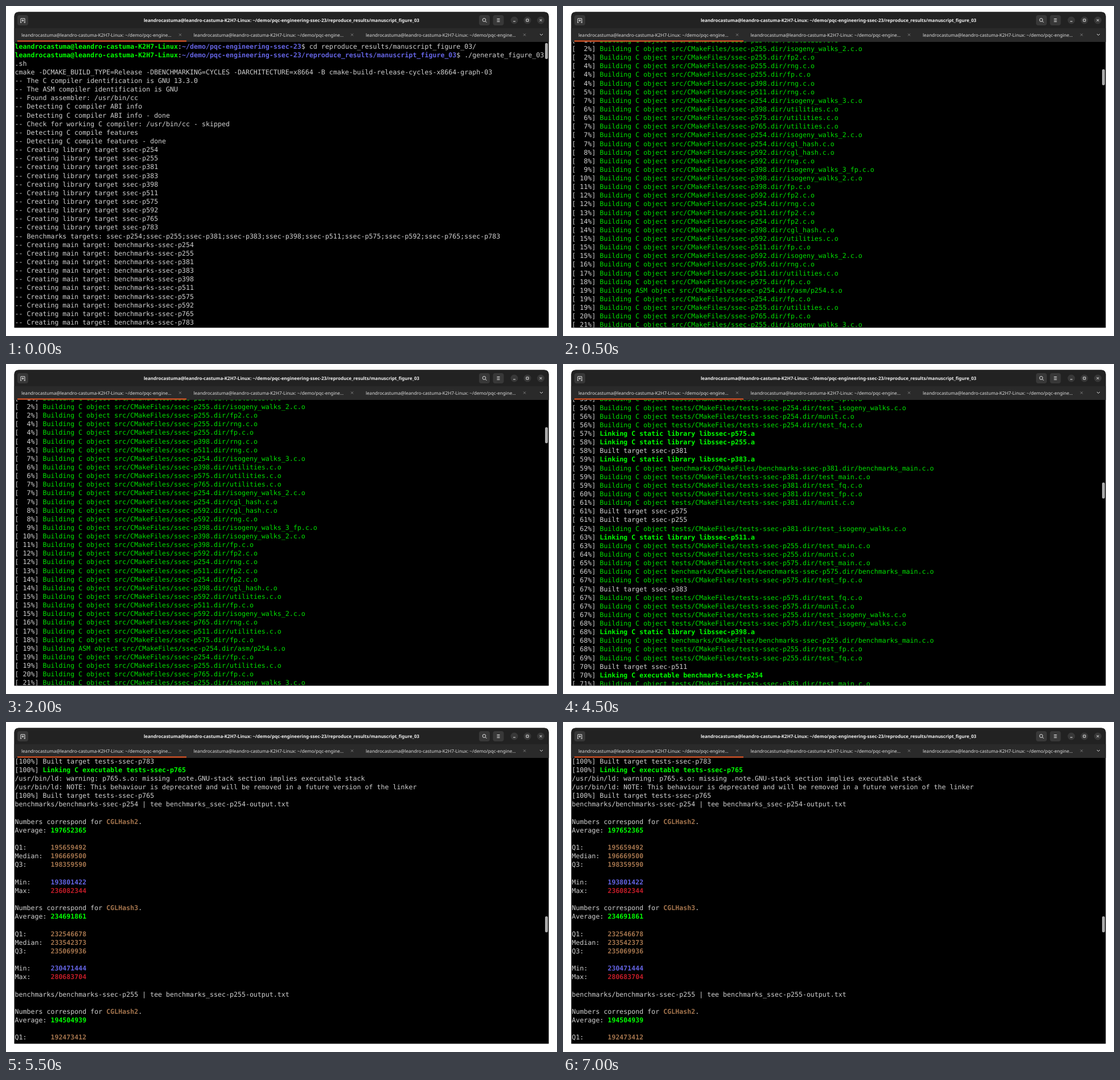
An HTML page that plays this animation: 968x579 px, repeating every 8000 ms.

```html
<!DOCTYPE html>
<html lang="en">
<head>
<meta charset="utf-8">
<title>Terminal build</title>
<style>
  html, body { margin: 0; width: 100%; height: 100%; overflow: hidden; background: #fff; }
  svg { position: absolute; left: 0; top: 0; font-family: "Noto Sans", sans-serif; text-rendering: geometricPrecision; }
  #view { position: absolute; left: 15px; top: 63px; width: 938px; height: 501px; overflow: hidden; }
  pre {
    position: absolute; left: .5px; margin: 0; color: #d0d0d0;
    font: 11.61px/15.14px "DejaVu Sans Mono", monospace; text-rendering: geometricPrecision;
  }
  #thumb { position: absolute; left: 932px; width: 5px; height: 28px; border-radius: 2px; background: #aaa; }
  i { font-style: normal; color: #00e000; }
  .green { color: #0f0; }
  .blue { color: #6464e4; }
  .brown { color: #a2734c; }
  .red { color: #c01c28; }
</style>
</head>
<body>
<svg width="968" height="579" fill="none" stroke="#e4e4e4">
  <g stroke="none">
    <path d="M14.500 564.500V18.500q0-8 8-8H945.500q8 0 8 8V564.500z" fill="#000"/>
    <path d="M14.500 63V18.500q0-8 8-8H945.500q8 0 8 8V63z" fill="#222"/>
    <path d="M14.500 39H953.500V63H14.500z" fill="#2a2a2a"/>
  </g>
  <path d="M20 61.5H317" stroke="#e95420" stroke-width="2"/>
  <g fill="#383838" stroke="none">
    <rect x="20" y="16" width="19" height="18" rx="4"/>
    <rect x="831" y="16" width="19" height="18" rx="4"/>
    <rect x="855.5" y="16" width="19" height="18" rx="4"/>
    <circle cx="893" cy="25" r="6.5"/><circle cx="916" cy="25" r="6.5"/><circle cx="939.5" cy="25" r="6.5"/>
  </g>
  <path d="M26 29V22h7v7M25 29h2.5M31.500 29H34M29.500 23.500v4M27.500 25.500h4"/>
  <circle cx="840" cy="24.500" r="2.800"/>
  <path d="M842 26.500l2.500 2.500M862.500 22.500h5M862.500 25h5M862.500 27.500h5M891 27h4M914 23h4v4h-4zM937.500 23l4 4m0-4l-4 4M938 49l2.500 2.500L943 49"/>
  <g id="labels" fill="#ddd" stroke="none" font-size="8.06"></g>
  <path id="crosses" stroke="#858585" stroke-width=".9"/>
</svg>
<div id="view"><pre id="screen"></pre><div id="thumb"></div></div>

<script>
const $ = id => document.getElementById(id);
const user = "leandrocastuma@leandro-castuma-K2H7-Linux";
const project = "~/demo/pqc-engineering-ssec-23";
const folder = "/reproduce_results/manuscript_figure_03";
const primes = [254, 255, 381, 383, 398, 511, 575, 592, 765, 783];

const bold = (color, text) => `<b class="${color}">${text}</b>`;
const prompt = (path, command) => `${bold("green", user)}:${bold("blue", path)}$ ${command}`;
const progress = (percent, text) => `[${String(percent).padStart(3)}%] ${text}`;
const lines = text => text.trim().split("\n");

// Window labels
$("labels").innerHTML =
  `<text x="484" y="28" text-anchor="middle" font-size="7.98" font-weight="700" fill="#f2f2f2">${user}: ${project}${folder}</text>` +
  [27, 329.5, 632].map(x => `<text x="${x}" y="53.5">${user}: ~/demo/pqc-engine…</text>`).join("");
$("crosses").setAttribute("d", [306, 608, 911].map(x => `M${x - 2} 48.5l4 4m0-4l-4 4`).join(""));

const configure = [
  prompt(project, "cd reproduce_results/manuscript_figure_03/"),
  prompt(project + folder, "./generate_figure_03"),
  ".sh",
  "cmake -DCMAKE_BUILD_TYPE=Release -DBENCHMARKING=CYCLES -DARCHITECTURE=x8664 -B cmake-build-release-cycles-x8664-graph-03",
  ...[
    "The C compiler identification is GNU 13.3.0",
    "The ASM compiler identification is GNU",
    "Found assembler: /usr/bin/cc",
    "Detecting C compiler ABI info",
    "Detecting C compiler ABI info - done",
    "Check for working C compiler: /usr/bin/cc - skipped",
    "Detecting C compile features",
    "Detecting C compile features - done",
    ...primes.map(p => `Creating library target ssec-p${p}`),
    "Benchmarks targets: " + primes.map(p => `ssec-p${p}`).join(";"),
    ...primes.map(p => `Creating main target: benchmarks-ssec-p${p}`)
  ].map(text => "-- " + text)
];

// Each row: percent, prime, file
const compile = lines(`
1 254 utilities
2 255 isogeny_walks_2
2 255 fp2
4 255 rng
4 255 fp
4 398 rng
5 511 rng
7 254 isogeny_walks_3
6 398 utilities
6 575 utilities
7 765 utilities
7 254 isogeny_walks_2
7 254 cgl_hash
8 592 cgl_hash
8 592 rng
9 398 isogeny_walks_3_fp
10 398 isogeny_walks_2
11 398 fp
12 592 fp2
12 254 rng
13 511 fp2
14 254 fp2
14 398 cgl_hash
15 592 utilities
15 511 fp
15 592 isogeny_walks_2
16 765 rng
17 511 utilities
18 575 fp
19 254 asm/p254.s
19 254 fp
19 255 utilities
20 765 fp
21 255 isogeny_walks_3`).map(row => {
  const [percent, prime, file] = row.split(" ");
  const asm = file.endsWith(".s");
  return progress(percent, `<i>Building ${asm ? "ASM" : "C"} object src/CMakeFiles/ssec-p${prime}.dir/${file}${asm ? "" : ".c"}.o</i>`);
});

// Each row: percent, prime, step (a test file unless it names another action)
const actions = {
  link: p => bold("green", `Linking C static library libssec-p${p}.a`),
  program: p => bold("green", `Linking C executable benchmarks-ssec-p${p}`),
  built: p => `Built target ssec-p${p}`,
  bench: p => `<i>Building C object benchmarks/CMakeFiles/benchmarks-ssec-p${p}.dir/benchmarks_main.c.o</i>`
};
const test = (p, file) => `<i>Building C object tests/CMakeFiles/tests-ssec-p${p}.dir/${file}.c.o</i>`;
const link = lines(`
55 254 test_fp
56 254 test_isogeny_walks
56 254 munit
56 254 test_fq
57 575 link
58 255 link
58 381 built
59 383 link
59 381 bench
59 381 test_main
59 381 test_fq
60 381 test_fp
61 381 munit
61 575 built
61 255 built
62 381 test_isogeny_walks
63 511 link
63 255 test_main
64 255 munit
65 575 test_main
66 575 bench
67 575 test_fp
67 383 built
67 575 test_fq
67 575 munit
67 255 test_isogeny_walks
68 575 test_isogeny_walks
68 398 link
68 255 bench
68 255 test_fp
69 255 test_fq
70 511 built
70 254 program
71 383 test_main`).map(row => {
  const [percent, prime, step] = row.split(" ");
  return progress(percent, actions[step] ? actions[step](prime) : test(prime, step));
});

const run = p => `benchmarks/benchmarks-ssec-p${p} | tee benchmarks_ssec-p${p}-output.txt`;
const layout = [["Average", "green"], , ["Q1", "brown"], ["Median", "brown"], ["Q3", "brown"], , ["Min", "blue"], ["Max", "red"]];
function stats(name, ...values) {
  const rows = Array.from(layout, entry =>
    entry ? (entry[0] + ":").padEnd(9) + bold(entry[1], values.shift() ?? "") : "");
  return ["", `Numbers correspond for ${bold("brown", name)}.`, ...rows];
}
const results = [
  progress(100, "Built target tests-ssec-p783"),
  progress(100, bold("green", "Linking C executable tests-ssec-p765")),
  "/usr/bin/ld: warning: p765.s.o: missing .note.GNU-stack section implies executable stack",
  "/usr/bin/ld: NOTE: This behaviour is deprecated and will be removed in a future version of the linker",
  progress(100, "Built target tests-ssec-p765"),
  run(254),
  ...stats("CGLHash2", 197652365, 195659492, 196669500, 198359590, 193801422, 236082344),
  ...stats("CGLHash3", 234691861, 232546678, 233542373, 235069936, 230471444, 280683704),
  "",
  run(255),
  ...stats("CGLHash2", 194504939, 192473412).slice(0, 5)
];

const scenes = [
  { start: 0, rows: configure, top: .5, thumb: 2 },
  { start: 500, rows: compile, top: -10.2, thumb: 48 },
  { start: 3000, rows: link, top: -8.6, thumb: 145 },
  { start: 5500, rows: results, top: -1.3, thumb: 278 }
];
let shown;

function draw() {
  const time = performance.now() % 8000;
  const scene = scenes.findLast(s => time >= s.start);
  if (scene !== shown) {
    shown = scene;
    $("screen").innerHTML = scene.rows.join("\n");
    $("screen").style.top = scene.top + "px";
    $("thumb").style.top = scene.thumb + "px";
  }
  requestAnimationFrame(draw);
}
draw();
</script>
</body>
</html>
```
